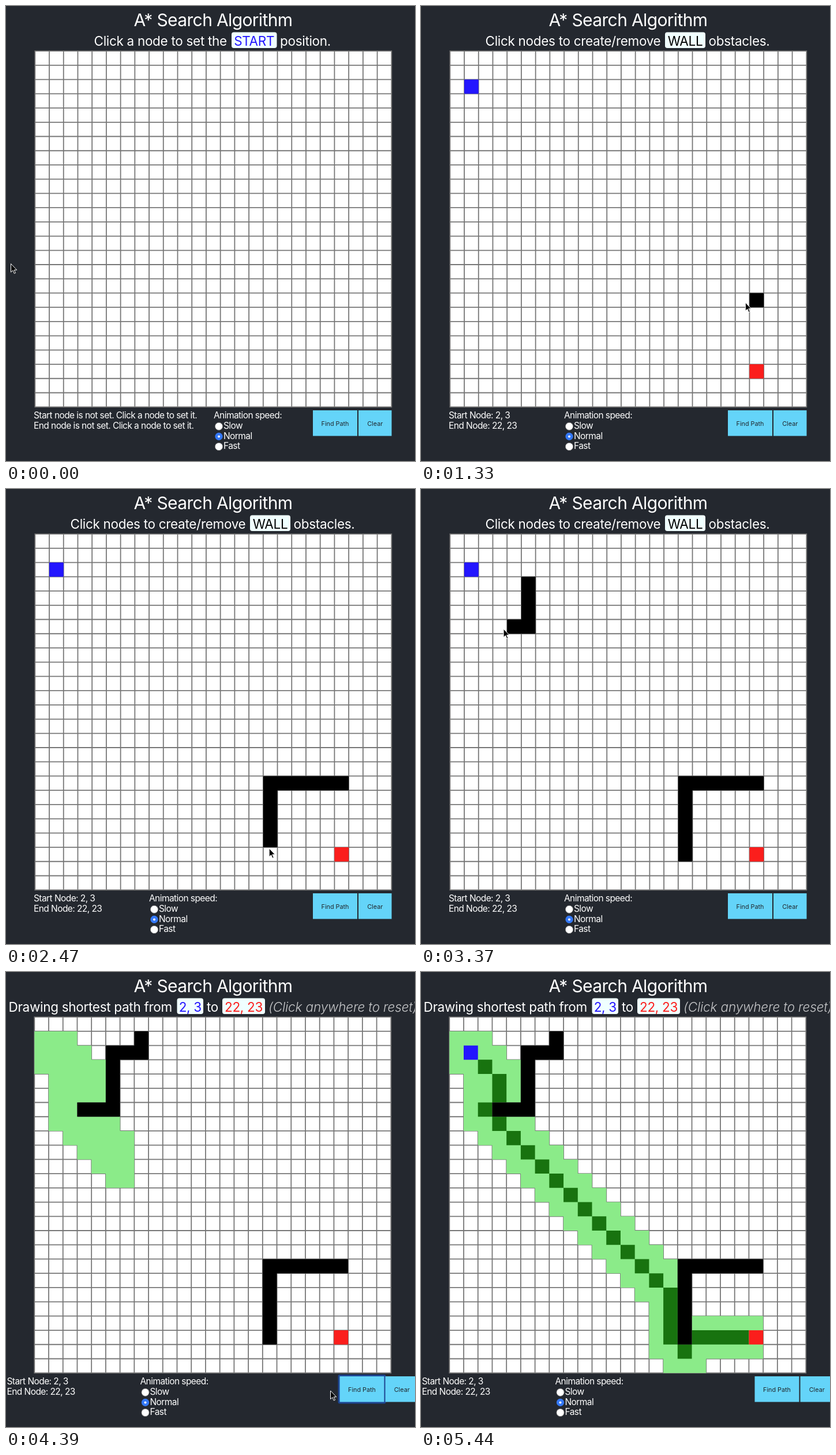
Recreate the animation shown at these times as an HTML page. Size 709 by 790 pixels, loop 5500 ms.

```html
<!DOCTYPE html>
<html lang="en">
<head>
<meta charset="utf-8">
<title>A* Search Algorithm</title>
<style>
html, body { margin: 0; width: 100%; height: 100%; overflow: hidden; background: #24282f; }
svg { display: block; width: 100%; height: 100%; font-family: Inter, Roboto, sans-serif; fill: #fff; }
.title { font-size: 30px; letter-spacing: -.63px; }
.head { font-size: 22.5px; letter-spacing: -.3px; }
.hint { font-style: italic; font-weight: 300; fill: #c6c7c9; letter-spacing: -.15px; }
.note { font-size: 15.5px; letter-spacing: -.57px; }
.btn { font-size: 10.8px; fill: #20262c; }
.mid { text-anchor: middle; }
</style>
</head>
<body>
<svg viewBox="0 0 709 790">
  <rect width="709" height="790" fill="#24282f"/>
  <text class="title mid" x="359" y="34.5">A* Search Algorithm</text>
  <g id="scenes"></g>
  <g id="grid">
    <rect x="-.9" y="-.9" width="619.8" height="619.8" fill="#767676"/>
    <path id="empty" fill="#fff"/>
    <path id="seen" fill="#8beb89"/>
    <path id="route" fill="#18730f"/>
    <path id="wall" fill="#000"/>
    <path id="start" fill="#2316ff"/>
    <path id="end" fill="#fb1e1c"/>
  </g>
  <path id="cursor" d="M0 0V14.6L3.4 11.5L5.8 17L8 16L5.6 10.8H10.2Z" fill="#000" stroke="#fff"/>
</svg>
<script>
const LOOP = 5500, STEP = 60, N = 25, CELL = 24.72, LEFT = 50.3, TOP = 78.2;
const SET_START = 550, SET_END = 910, SEARCH = 4330, DONE = 4510, HIDE = 5260, BLUR = 5440;
const BLUE = '#2316ff', RED = '#fb1e1c';
const $ = id => document.getElementById(id);

// page text and controls
const text = (cls, x, y, s, more = '') => `<text class="${cls}" x="${x}" y="${y}" ${more}>${s}</text>`;
const head = (x, s, cls = '') => text('head ' + cls, x, 68.5, s);
const chip = (x, w, s, color) =>
  `<rect x="${x}" y="45.5" width="${w}" height="27.5" rx="4" fill="#f0ffff"/>` +
  text('head mid', x + w / 2, 68.5, s, `fill="${color}"`);

function speedBox(x) {
  return text('note', x, 715.8, 'Animation speed:') + ['Slow', 'Normal', 'Fast'].map((s, i) => {
    const y = 729.8 + i * 17.6, on = i === 1;
    const dot = (r, look) => `<circle cx="${x + 9}" cy="${y}" r="${r}" ${look}/>`;
    return dot(6.6, on ? 'fill="#3478f6"' : 'stroke="#777" stroke-width=".8"') +
      (on ? dot(2, '') : '') + text('note', x + 17, y + 4.2, s);
  }).join('');
}

function buttons(dx) {
  const one = (x, w, s) => `<rect x="${x + dx}" y="702" width="${w}" height="44.5" fill="#64d4f9"/>` +
    text('btn mid', x + dx + w / 2, 728.8, s);
  return one(532, 77, 'Find Path') + one(611, 57.5, 'Clear');
}

const footer = (x, a, b, speedX, dx = 0) =>
  text('note', x, 715.8, a) + text('note', x, 733.8, b) + speedBox(speedX) + buttons(dx);

const unset = s => s + ' node is not set. Click a node to set it.';
const startSet = 'Start Node: 2, 3', endSet = 'End Node: 22, 23';
const scenes = [
  { from: 0, svg: head(152.5, 'Click a node to set the') + chip(391, 78.5, 'START', BLUE) +
      head(475, 'position.') + footer(48, unset('Start'), unset('End'), 360) },
  { from: SET_START, svg: head(164.5, 'Click a node to set the') + chip(403, 54, 'END', RED) +
      head(463, 'position.') + footer(48, startSet, unset('End'), 355) },
  { from: SET_END, svg: head(111.5, 'Click nodes to create/remove') + chip(423, 70, 'WALL', '#000') +
      head(498.5, 'obstacles.') + footer(48, startSet, endSet, 248) },
  { from: SEARCH, svg: head(4.5, 'Drawing shortest path from') + chip(296.5, 45.5, '2, 3', BLUE) +
      head(348, 'to') + chip(375, 74, '22, 23', RED) + head(455, '(Click anywhere to reset)', 'hint') +
      '<rect id="ring" x="575.5" y="699" width="83" height="50.5" rx="3" fill="#1d4490"/>' +
      footer(1.5, startSet, endSet, 232.5, 46.5) }
];
$('scenes').innerHTML = scenes.map(s => `<g>${s.svg}</g>`).join('');
const sceneNodes = [...$('scenes').children];

// every cell on a straight or diagonal line
function line([c0, r0], [c1, r1]) {
  const n = Math.max(Math.abs(c1 - c0), Math.abs(r1 - r0));
  return Array.from({ length: n + 1 }, (_, i) => {
    const k = n ? i / n : 0;
    return [c0 + (c1 - c0) * k, r0 + (r1 - r0) * k];
  });
}
const key = ([c, r]) => c + r * N;
const unique = cells => [...new Map(cells.map(p => [key(p), p])).values()];

// walls are drawn by dragging, cell by cell at an even pace
const START = [1, 2], END = [21, 22];
const strokes = [
  { a: [21, 17], b: [16, 17], t0: 1210, t1: 2060 },
  { a: [16, 18], b: [16, 22], t0: 2120, t1: 2530 },
  { a: [5, 3], b: [5, 6], t0: 2830, t1: 3130 },
  { a: [4, 6], b: [3, 6], t0: 3250, t1: 3430 },
  { a: [5, 2], b: [7, 2], t0: 3550, t1: 3730 },
  { a: [7, 1], b: [7, 1], t0: 3790, t1: 3850 }
];
const walls = strokes.flatMap(({ a, b, t0, t1 }) =>
  line(a, b).map((p, i, all) => ({ p, at: t0 + (t1 - t0) * i / Math.max(1, all.length - 1) })));
const blocked = new Set(walls.map(w => key(w.p)));

// the route by its corners; the search looks at all neighbours of each node
const corners = [START, [3, 4], [3, 5], [2, 6], [3, 7], [15, 19], [15, 22], [16, 23], [17, 22], END];
const nodes = unique(corners.slice(1).flatMap((p, i) => line(corners[i], p)));
const route = nodes.slice(1, -1);
const around = ([c, r]) => [-1, 0, 1].flatMap(dx => [-1, 0, 1].map(dy => [c + dx, r + dy]))
  .filter(p => key(p) !== key([c, r]) && !blocked.has(key(p)));
const visited = unique(nodes.slice(0, -1).flatMap(around));
const PER_STEP = 41;

// cursor: rests at clicks, follows the strokes, ends on the button
const tip = ([c, r]) => [LEFT + (c + .5) * CELL - 2, TOP + (r + .5) * CELL + 4];
const track = [
  { t: 0, p: [8.5, 447.5] }, { t: 300, p: [81.5, 147.5] }, { t: SET_START, p: [81.5, 147.5] },
  { t: 850, p: tip(END) }, { t: 970, p: tip(END) },
  ...strokes.flatMap(s => [{ t: s.t0, p: tip(s.a) }, { t: s.t1, p: tip(s.b), drag: true }]),
  { t: 4270, p: [562.5, 727] }, { t: LOOP, p: [562.5, 727] }
];
function cursorAt(t) {
  const i = Math.max(1, track.findIndex(k => k.t >= t));
  const a = track[i - 1], b = track[i], k = (t - a.t) / (b.t - a.t);
  const e = b.drag ? k : k * k * (3 - 2 * k);
  return a.p.map((v, j) => v + (b.p[j] - v) * e);
}

const square = inset => ([c, r]) => {
  const s = CELL - 2 * inset;
  return `M${(c * CELL + inset).toFixed(2)} ${(r * CELL + inset).toFixed(2)}h${s}v${s}h${-s}z`;
};
const fill = (id, cells, inset = 0) => $(id).setAttribute('d', cells.map(square(inset)).join(''));
const show = (node, on) => node.setAttribute('display', on ? 'inline' : 'none');
const allCells = Array.from({ length: N * N }, (_, i) => [i % N, Math.floor(i / N)]);

function draw(t) {
  const done = t >= DONE, searching = t >= SEARCH;
  const current = scenes.filter(s => s.from <= t).length - 1;
  sceneNodes.forEach((g, i) => show(g, i === current));

  const count = done ? visited.length : Math.max(0, Math.round((t - SEARCH) / STEP) * PER_STEP);
  const seen = visited.slice(0, count);
  const covered = !done && seen.some(p => key(p) === key(START));
  const groups = {
    seen,
    wall: walls.filter(w => w.at <= t).map(w => w.p),
    route: done ? route : [],
    start: t >= SET_START && !covered ? [START] : [],
    end: t >= SET_END ? [END] : []
  };
  const used = new Set(Object.values(groups).flat().map(key));
  for (const id in groups) fill(id, groups[id]);
  fill('empty', allCells.filter(p => !used.has(key(p))), .9);
  $('grid').setAttribute('transform', `translate(${searching ? LEFT - 1 : LEFT} ${TOP})`);

  $('cursor').setAttribute('transform', `translate(${cursorAt(t)})`);
  show($('cursor'), t < HIDE);
  show($('ring'), t < BLUR);
}

// the picture advances in fixed steps, with a rest before the first click
function stepped(t) {
  if (t < SET_START) return Math.min(300, Math.floor(t / STEP) * STEP);
  if (t >= BLUR) return BLUR;
  if (t >= HIDE) return HIDE;
  return SET_START + Math.floor((t - SET_START) / STEP) * STEP;
}

const origin = performance.now();
let last = -1;
function tick() {
  const t = stepped((performance.now() - origin) % LOOP);
  if (t !== last) draw(last = t);
  requestAnimationFrame(tick);
}
tick();
</script>
</body>
</html>
```
